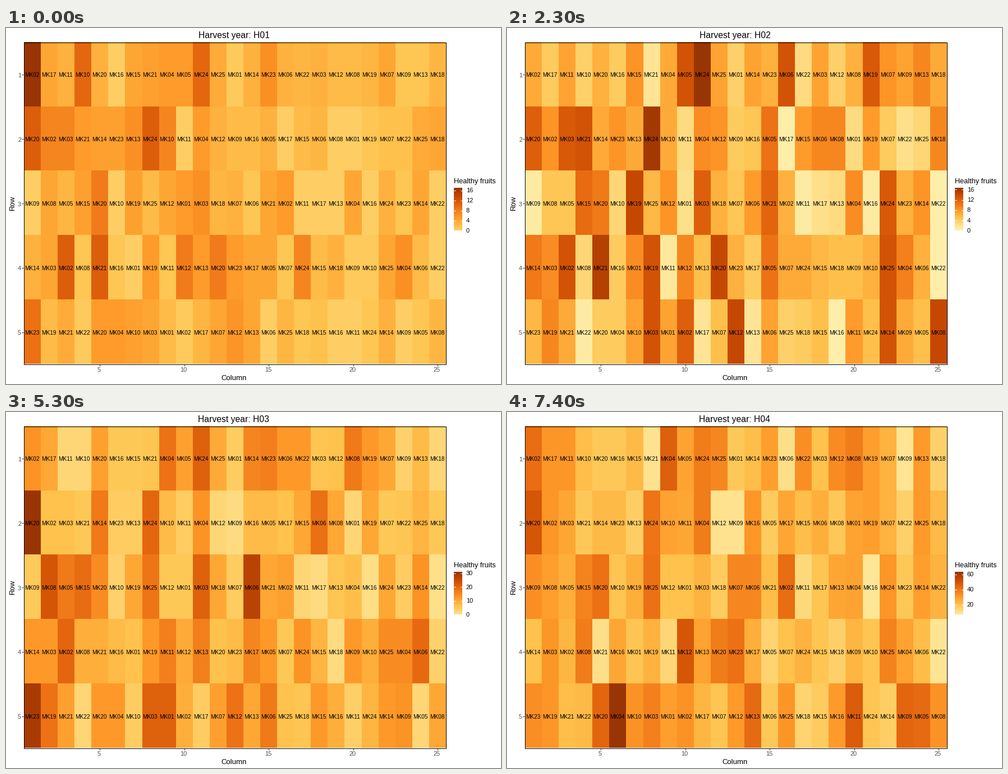
These frames come from a looping animation (882x635 px, 8000 ms). A matplotlib script:

```python
import matplotlib.pyplot as plt
import numpy as np
from matplotlib.animation import FuncAnimation
from matplotlib.colors import LinearSegmentedColormap
from matplotlib.patches import Rectangle

W, H, DPI = 882, 635, 100
LEFT, RIGHT, TOP, BOTTOM = 31.5, 783.5, 25.5, 599.5
COLS, ROWS = 25, 5
BAR_X, BAR_W, BAR_TOP, BAR_BOTTOM = 798, 15, 285, 361
PX = 72 / DPI

plt.rcParams["font.family"] = "Liberation Sans"

plants = [
    [2, 17, 11, 10, 20, 16, 15, 21, 4, 5, 24, 25, 1, 14, 23, 6, 22, 3, 12, 8, 19, 7, 9, 13, 18],
    [20, 2, 3, 21, 14, 23, 13, 24, 10, 11, 4, 12, 9, 16, 5, 17, 15, 6, 8, 1, 19, 7, 22, 25, 18],
    [9, 8, 5, 15, 20, 10, 19, 25, 12, 1, 3, 18, 7, 6, 21, 2, 11, 17, 13, 4, 16, 24, 23, 14, 22],
    [14, 3, 2, 8, 21, 16, 1, 19, 11, 12, 13, 20, 23, 17, 5, 7, 24, 15, 18, 9, 10, 25, 4, 6, 22],
    [23, 19, 21, 22, 20, 4, 10, 3, 1, 2, 17, 7, 12, 13, 6, 25, 18, 15, 16, 11, 24, 14, 9, 5, 8],
]

# Healthy fruits per plot, one grid for each harvest
first = [
    [17, 4, 3, 10, 3, 0, 4, 4.5, 5, 5, 10, 3.5, 0.5, 3, 6, 3, 2.5, 3, 2, 2, 2.5, 4, 1, 1, 2.5],
    [11, 7, 7, 5, 4.5, 4.5, 6, 11, 7, 0, 5, 3, 2, 2, 3, 0, 2, 2.5, 0, 0, 1, 1.5, 1.5, 3.5, 4],
    [0, 4, 2.5, 4.5, 8, 0, 4.5, 2, 4, 5, 6, 2.5, 3, 1, 4, 5, 0, 0, 0, 4, 0, 3, 1, 4, 0],
    [3, 4, 11, 1, 11, 1, 0, 5, 1, 8, 5, 8, 5, 4, 4, 1, 7, 2, 3, 0.5, 0.5, 4, 6, 2, 0],
    [9, 2, 3.5, 0.5, 5, 5, 4.5, 4, 2, 0.5, 2.5, 4, 5.5, 4, 0, 2.5, 1, 1.5, 0, 0, 1, 3, 0, 1, 2.5],
]
second = [
    [6.5, 4, 7, 3.5, 6, 4, 8, 1.5, 6.5, 13, 16.6, 7, 3.5, 7, 6, 13, 2.5, 7, 3.5, 6, 12.5, 8, 7, 9, 6.5],
    [12, 8, 12.5, 13, 6.5, 8, 6.5, 16, 6.5, 2.5, 8.5, 8, 4, 4.5, 10.5, 0, 7.5, 9, 9, 2.5, 7.5, 4, 2, 3, 9],
    [0.5, 4.5, 4.5, 11, 10, 3, 14, 5.5, 8, 2, 12, 6, 4.5, 7.5, 11.5, 6, 0.5, 2, 2.5, 8.5, 0.5, 12.5, 6, 8, 0],
    [10, 8.5, 13, 3, 15, 4, 8.5, 13, 1, 9, 5, 14, 6, 4, 10.5, 6.5, 6.5, 5.5, 5, 5, 6, 13, 9.5, 6, 0],
    [5.5, 9, 6.5, 0.5, 4, 4, 7, 13, 7, 12, 1.5, 5, 14, 1.5, 7, 3.5, 4, 5, 0, 7.5, 5, 13, 6.5, 5, 14],
]
third = [
    [13, 10, 2, 2, 11, 5, 5, 5.5, 18, 11, 21, 9.5, 4, 15, 16, 12, 12, 5.5, 6, 17, 12, 10, 3, 7, 2],
    [31, 6, 6, 5, 17, 4, 4, 20, 7, 4, 13, 2, 1, 7, 7, 6, 10, 18.5, 10, 2, 10, 5, 5.5, 8, 5],
    [4.5, 23, 17, 19, 14, 3, 10, 17.5, 5, 5, 21, 10, 4, 27, 10, 11, 2, 1, 5.5, 6.5, 0.5, 10, 4, 13, 0],
    [12, 12, 20, 9, 9, 7, 6, 12, 16, 9.5, 16, 6, 7, 15, 12, 5, 13, 8, 1, 12, 9, 14, 14, 19.5, 3],
    [29, 18, 11, 2, 12, 12, 4, 21, 21, 9, 4, 11, 18, 10, 17, 6, 5.5, 12, 9, 3.5, 8, 12, 13, 2, 10],
]
fourth = [
    [42, 31, 31, 21, 18, 18, 22, 9, 46, 28, 38, 35, 18, 21, 29, 10, 33, 20, 34, 38, 29, 24, 8, 30, 15],
    [49, 31, 27, 18, 22, 22, 16, 40, 28, 27, 38, 9, 9, 31, 17, 27, 21, 25, 18, 28, 29, 24, 15, 30, 22],
    [33, 29, 25, 36, 41, 19, 25, 41, 20, 20, 24, 17, 35, 35, 21, 42, 12, 19, 27, 28, 7, 31, 18, 29, 24],
    [20, 31, 23, 38, 10, 27, 19, 24, 13, 49, 28, 38, 41, 25, 14, 20, 24, 19, 15, 23, 19, 36, 28, 21, 8],
    [33, 31, 21, 22, 44, 63, 32, 37, 29, 32, 23, 19, 30, 43, 18, 31, 14, 17, 30, 47, 19, 16, 44, 43, 32],
]

# (title, grid, middle of the colour scale, legend breaks)
years = [
    ("H01", np.array(first), 5.2, [0, 4, 8, 12, 16]),
    ("H02", np.array(second), 7.7, [0, 4, 8, 12, 16]),
    ("H03", np.array(third), 12.1, [0, 10, 20, 30]),
    ("H04", np.array(fourth), 30.4, [20, 40, 60]),
]
STARTS = [500, 3500, 6500]
STEP, LOOP = 500, 8000

amber = LinearSegmentedColormap.from_list(
    "amber",
    ["#FFF7BC", "#FEE391", "#FEC44F", "#FE9929", "#EC7014", "#CC4C02", "#993404"],
    N=1024,
)

fig = plt.figure(figsize=(W / DPI, H / DPI), dpi=DPI, facecolor="white")
ax = fig.add_axes([0, 0, 1, 1])


def label(x, y, text, size, color="black", ha="center", **kw):
    return ax.text(x, y, text, fontsize=size * PX, color=color, ha=ha, va="baseline", **kw)


def line(xs, ys, color, z=3):
    return ax.plot(xs, ys, color=color, lw=PX, solid_capstyle="butt", zorder=z)[0]


def image(rows, cols, extent):
    return ax.imshow(np.ones((rows, cols, 3)), extent=extent, aspect="auto",
                     interpolation="nearest", zorder=1)


def col_x(c):
    return LEFT + (c + 0.5) * (RIGHT - LEFT) / COLS


def row_y(r):
    return TOP + (r + 0.5) * (BOTTOM - TOP) / ROWS


cells = image(ROWS, COLS, (LEFT, RIGHT, BOTTOM, TOP))
bar = image(BAR_BOTTOM - BAR_TOP, 1, (BAR_X, BAR_X + BAR_W, BAR_BOTTOM, BAR_TOP))
ax.set(xlim=(0, W), ylim=(H, 0))
ax.axis("off")
ax.add_patch(Rectangle((LEFT, TOP), RIGHT - LEFT, BOTTOM - TOP, fill=False,
                       ec="black", lw=PX, zorder=4))

for r, row in enumerate(plants):
    y = row_y(r)
    for c, plant in enumerate(row):
        label(col_x(c) - 0.4, y + 4.5, f"MK{plant:02d}", 10)
    label(27, y + 5, str(r + 1), 11, "#4D4D4D", "right")
    line([28, 31], [int(y) + 0.5] * 2, "#333333")

for n in range(5, COLS + 1, 5):
    x = col_x(n - 1)
    line([int(x) + 0.5] * 2, [600, 603], "#333333")
    label(x - 0.8, 613, str(n), 11, "#4D4D4D")

title = label(406, 18, "", 15.7)
label(406.3, 628, "Column", 13.1)
label(798, 277, "Healthy fruits", 12.8, ha="left")
ax.text(12, 312, "Row", fontsize=13.1 * PX, rotation=90, ha="center", va="center")

# Each legend break: a number and a notch on both sides of the bar
breaks = [
    (label(820, 0, "", 11, ha="left"),
     line([BAR_X, BAR_X + 3], [0, 0], "white"),
     line([BAR_X + BAR_W - 3, BAR_X + BAR_W], [0, 0], "white"))
    for _ in range(5)
]


def shade(values, mid, top):
    return amber(0.5 + 0.5 * (values - mid) / (top - mid))[..., :3]


def draw(i):
    name, grid, mid, marks = years[sum(i * STEP >= t for t in STARTS)]
    low, top = grid.min(), grid.max()
    title.set_text(f"Harvest year: {name}")
    cells.set_data(shade(grid, mid, top))
    ramp = np.linspace(top, low, BAR_BOTTOM - BAR_TOP)
    bar.set_data(shade(ramp[:, None], mid, top))
    for k, (text, *notches) in enumerate(breaks):
        shown = k < len(marks)
        for part in (text, *notches):
            part.set_visible(shown)
        if shown:
            y = BAR_BOTTOM - (marks[k] - low) / (top - low) * (BAR_BOTTOM - BAR_TOP)
            text.set_text(str(marks[k]))
            text.set_y(y + 4)
            for notch in notches:
                notch.set_ydata([min(int(y), BAR_BOTTOM - 1) + 0.5] * 2)
    return [cells, bar, title]


anim = FuncAnimation(fig, draw, frames=LOOP // STEP, interval=STEP,
                     repeat=True, repeat_delay=0, blit=False)
plt.show()
```
